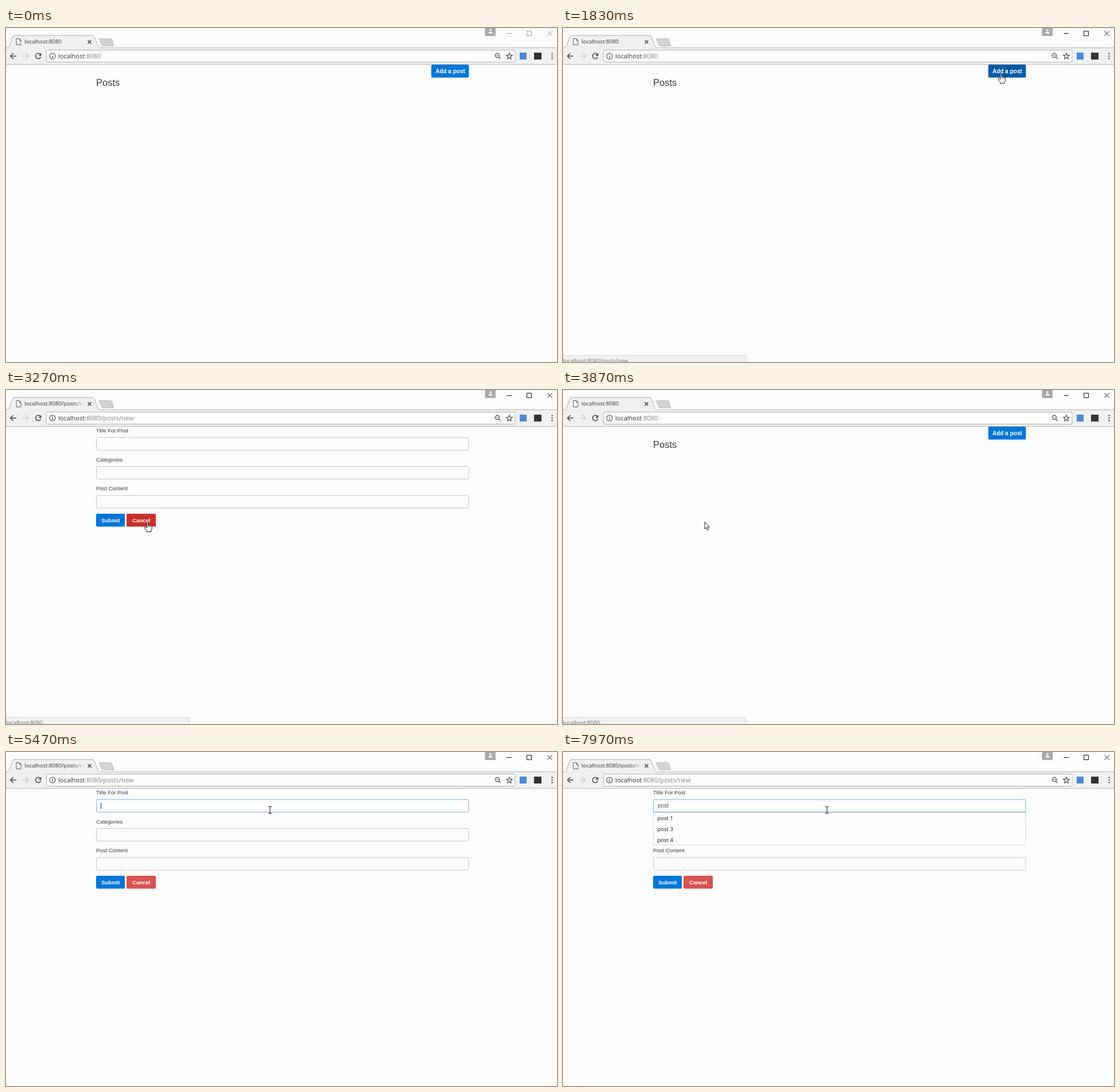
Animation of 960 by 583 pixels, one loop 8 s. Source, as an HTML page:

```html
<!DOCTYPE html>
<html lang="en">
<head>
<meta charset="utf-8">
<title>Posts</title>
<style>
  html, body { margin: 0; width: 100%; height: 100%; overflow: hidden; background: #fdfdfd; }
  svg { display: block; width: 960px; height: 583px; }
  .ui { font-family: "Open Sans", "Noto Sans", sans-serif; }
  .page { font-family: "Liberation Sans", Arial, sans-serif; font-size: 9.5px; fill: #373a3c; }
  .line { fill: none; stroke: #454545; stroke-width: 1.5; }
  .field { fill: #fdfdfd; stroke: #c5c5cc; }
  .field.focus { stroke: #74b0e6; }
  .label { fill: #fff; font-weight: bold; text-anchor: middle; }
  .primary { fill: #0275d8; }
  .primary.hover { fill: #025aa5; }
  .danger { fill: #d9534f; }
  .danger.hover { fill: #c9302c; }
  .pointer { fill: #fff; stroke: #222; stroke-linejoin: round; }
</style>
</head>
<body>
<svg viewBox="0 0 960 583" xml:space="preserve">
  <defs>
    <linearGradient id="fade" gradientUnits="userSpaceOnUse" x1="118" x2="137" y1="0" y2="0">
      <stop stop-color="#fff"/><stop offset="1" stop-color="#000"/>
    </linearGradient>
    <mask id="titleMask" maskUnits="userSpaceOnUse" x="30" y="12" width="108" height="22">
      <rect x="30" y="12" width="108" height="22" fill="url(#fade)"/>
    </mask>
  </defs>

  <rect width="960" height="583" fill="#fdfdfd"/>

  <g id="listPage" class="page">
    <text x="157" y="101.3" font-size="16.5">Posts</text>
    <rect id="add" class="primary" x="741" y="64" width="65.5" height="22.5" rx="2"/>
    <text class="label" x="774" y="78.7" font-size="10">Add a post</text>
  </g>

  <g id="formPage" class="page">
    <text x="157" y="74">Title For Post</text>
    <rect id="titleField" class="field" x="157.5" y="83" width="648.5" height="22" rx="2"/>
    <text x="157" y="124.7">Categories</text>
    <rect class="field" x="157.5" y="133.5" width="648.5" height="22" rx="2"/>
    <text x="157" y="175.2">Post Content</text>
    <rect class="field" x="157.5" y="184.2" width="648.5" height="22" rx="2"/>
    <rect class="primary" x="157" y="216" width="50" height="22.5" rx="2"/>
    <text class="label" x="182.3" y="230.7">Submit</text>
    <rect id="cancel" class="danger" x="210" y="216" width="51" height="22.5" rx="2"/>
    <text class="label" x="235.6" y="230.7">Cancel</text>
    <text id="typed" x="165" y="97.4" font-size="10" fill="#55595c"></text>
    <path id="caret" d="M0 89V99.5" stroke="#333"/>
    <g id="suggestions" class="ui" fill="#111">
      <rect x="157.5" y="105.5" width="648.5" height="57" fill="#fdfdfd" stroke="#d8d8d8"/>
      <path d="M158 105H806" stroke="#74b0e6"/>
      <text x="164.5" y="119.3">post 1</text>
      <text x="164.5" y="138">post 3</text>
      <text x="164.5" y="156.7">post 4</text>
    </g>
  </g>

  <g id="status" class="ui">
    <path d="M-1 584V571.5H317.5Q319.5 571.5 319.5 573.5V584" fill="#f1f1f1" stroke="#d6d6d6"/>
    <text id="statusText" x="0" y="583.6" font-size="9.5" fill="#707070"></text>
  </g>

  <!-- window frame, tab and toolbar -->
  <rect y="35" width="960" height="28" fill="#f0f0f0"/>
  <path d="M0 34.5H960" stroke="#b4b4b4"/>
  <path d="M0 63.5H960" stroke="#b9b9b9"/>
  <path d="M2 35.5Q5 34 6 31L11 17Q12.500 13 15 13H150.500Q153 13 154.500 17L160 31Q161 34 164 35.500" fill="#f0f0f0" stroke="#ababab"/>
  <path d="M2.500 35.500H163.500" stroke="#f0f0f0" stroke-width="2"/>
  <path d="M162 18.500H181.500Q183.500 18.500 184.500 20.500L188 31.500H169.500Q167.500 31.500 166.500 29.500Z" fill="#d2d2d2" stroke="#c0c0c0"/>
  <path d="M18 18.500H23L26 21.500V29.500H18ZM23 18.500V21.500H26" fill="#fff" stroke="#555"/>
  <text id="tabTitle" class="ui" x="32.300" y="27.300" font-size="9.600" fill="#333" mask="url(#titleMask)"></text>
  <path class="line" stroke-width="1.300" d="M142.500 21.200l6 6m0 -6l-6 6"/>

  <path class="line" d="M18 49H8M12.700 44L7.700 49L12.700 54"/>
  <path class="line" style="stroke:#cbcbcb" d="M29 49H39M34.300 44L39.300 49L34.300 54"/>
  <path class="line" d="M60 46A4.700 4.700 0 1 0 60.700 50.500"/>
  <path d="M61.500 43.500V48.500H56.500Z" fill="#454545"/>

  <rect x="70.500" y="38.500" width="816.500" height="21" rx="2" fill="#fdfdfd" stroke="#b0b0b0"/>
  <circle class="line" cx="81" cy="49" r="5" style="stroke-width:1.100"/>
  <path class="line" style="stroke-width:1.300" d="M81 45.800V47M81 48.300V52"/>
  <text class="ui" x="91" y="52.900" font-size="11" fill="#808080"><tspan fill="#303030">localhost</tspan><tspan id="urlTail"></tspan></text>
  <circle class="line" cx="856" cy="48" r="3.600" style="stroke-width:1.200"/>
  <path class="line" style="stroke-width:1.200" d="M854.300 48H857.700M858.700 50.700L862 54"/>
  <path id="star" class="line" style="stroke-width:1.100"/>
  <rect x="895" y="43" width="12" height="12" fill="#4d86dd"/>
  <rect x="920" y="43" width="13" height="12" fill="#333"/>
  <g fill="#444">
    <circle cx="951.500" cy="44.700" r="1.200"/><circle cx="951.500" cy="49" r="1.200"/><circle cx="951.500" cy="53.300" r="1.200"/>
  </g>

  <rect x="834.500" width="18.500" height="14" fill="#a9a9a9"/>
  <path d="M840.500 9.500Q840.500 6.500 844 6.500T847.500 9.500Z" fill="#fff"/>
  <circle cx="844" cy="3.800" r="1.800" fill="#fff"/>
  <path id="controls" fill="none" d="M872.500 9.500H881M907.500 5.500H915.500V13.500H907.500ZM943.500 5.500L951.500 13.500M951.500 5.500L943.500 13.500"/>

  <g id="cursor">
    <path id="arrow" class="pointer" d="M.5 .5V12.500L3.200 10L5.200 14.500L7 13.700L5.100 9.300H8.800Z"/>
    <g id="hand">
      <path class="pointer" d="M-1 1.300Q0 -.5 1.200 1.300V6Q2.500 5 3.500 6.500Q5 5.700 5.700 7.200Q7.500 6.700 7.700 8.500V12Q7.500 14 6.300 15.500V17.500H-1V15.700L-4.800 11Q-5.500 9 -3.500 8.800L-1 10.500Z"/>
      <path d="M1.200 6V9M3.500 6.500V9M5.700 7.200V9.500" stroke="#222" stroke-width=".8"/>
    </g>
    <path id="beam" fill="none" stroke="#222" stroke-width="1.100" d="M-3 -5.800H-1Q0 -5.800 0 -4.800V5Q0 6 -1 6H-3M3 -5.800H1Q0 -5.800 0 -4.800M3 6H1Q0 6 0 5"/>
  </g>
</svg>
<script>
  const LOOP = 8000;
  const WINDOW_FOCUS = 900;
  const FIELD_FOCUS = 5400;

  // time, x, y of the pointer's hot spot
  const PATH = [
    [300, 876, 14], [780, 50, 170], [1000, 66, 108], [1640, 763, 79],
    [2150, 763, 79], [2630, 298, 131], [2690, 298, 131], [2960, 246.5, 230],
    [4000, 246.5, 230], [4480, 786, 79], [4950, 786, 79], [5320, 460, 101]
  ];
  // start time, shows the form
  const PAGES = [[0, false], [2060, true], [3400, false], [4900, true]];
  // fade-in start, fade-out start, link path
  const LINKS = [[1700, 2560, '/posts/new'], [2990, 4050, ''], [4500, 5030, '/posts/new']];
  const KEYS = [[6450, 'p'], [6750, 'po'], [7050, 'pos'], [7350, 'post']];
  const FADE_IN = 100, FADE_OUT = 180, BLINK = 530;

  const $ = id => document.getElementById(id);
  const clamp = v => Math.max(0, Math.min(1, v));
  const smooth = v => v * v * (3 - 2 * v);
  const show = (id, on) => { $(id).style.display = on ? '' : 'none'; };
  const latest = (table, t) => table.filter(row => row[0] <= t).pop();

  $('star').setAttribute('d', 'M' + Array.from({ length: 10 }, (_, i) => {
    const angle = i * Math.PI / 5, r = i % 2 ? 2.4 : 5.5;
    return (877 + r * Math.sin(angle)).toFixed(2) + ' ' + (49.3 - r * Math.cos(angle)).toFixed(2);
  }).join('L') + 'Z');

  function pointerAt(t) {
    const next = PATH.findIndex(p => p[0] > t);
    if (next < 0) return PATH[PATH.length - 1].slice(1);
    if (next === 0) return null;
    const [t0, x0, y0] = PATH[next - 1], [t1, x1, y1] = PATH[next];
    const k = smooth((t - t0) / (t1 - t0));
    return [x0 + (x1 - x0) * k, y0 + (y1 - y0) * k];
  }

  function inside(el, [x, y]) {
    const [left, top, w, h] = ['x', 'y', 'width', 'height'].map(a => +el.getAttribute(a));
    return x >= left && x <= left + w && y >= top && y <= top + h;
  }

  function drawPointer(t, form) {
    const pos = pointerAt(t);
    show('cursor', pos);
    const overAdd = !!pos && !form && inside($('add'), pos);
    const overCancel = !!pos && form && inside($('cancel'), pos);
    $('add').classList.toggle('hover', overAdd);
    $('cancel').classList.toggle('hover', overCancel);
    if (!pos) return;
    const overField = form && [...document.querySelectorAll('.field')].some(f => inside(f, pos));
    const overLink = overAdd || overCancel;
    show('hand', overLink);
    show('beam', overField);
    show('arrow', !overLink && !overField);
    $('cursor').setAttribute('transform', `translate(${pos[0]} ${pos[1]})`);
  }

  function drawForm(t) {
    const focused = t >= FIELD_FOCUS;
    const key = latest(KEYS, t);
    const text = key ? key[1] : '';
    const since = t - (key ? key[0] : FIELD_FOCUS);
    $('titleField').classList.toggle('focus', focused);
    $('typed').textContent = text;
    show('suggestions', key);
    show('caret', focused && Math.floor(since / BLINK) % 2 === 0);
    const width = text ? $('typed').getComputedTextLength() : 0.5;
    $('caret').setAttribute('transform', `translate(${165 + width} 0)`);
  }

  function drawStatus(t) {
    const link = latest(LINKS, t);
    $('status').style.opacity = link
      ? Math.min(clamp((t - link[0]) / FADE_IN), 1 - clamp((t - link[1]) / FADE_OUT)) : 0;
    $('statusText').textContent = link ? 'localhost:8080' + link[2] : '';
  }

  function render(now) {
    const t = now % LOOP;
    const form = latest(PAGES, t)[1];
    const tail = ':8080' + (form ? '/posts/new' : '');
    show('listPage', !form);
    show('formPage', form);
    $('urlTail').textContent = tail;
    $('tabTitle').textContent = 'localhost' + tail;
    $('controls').setAttribute('stroke', t < WINDOW_FOCUS ? '#999' : '#111');
    drawForm(t);
    drawStatus(t);
    drawPointer(t, form);
  }

  const start = performance.now();
  function tick() {
    render(performance.now() - start);
    requestAnimationFrame(tick);
  }
  tick();
</script>
</body>
</html>
```
